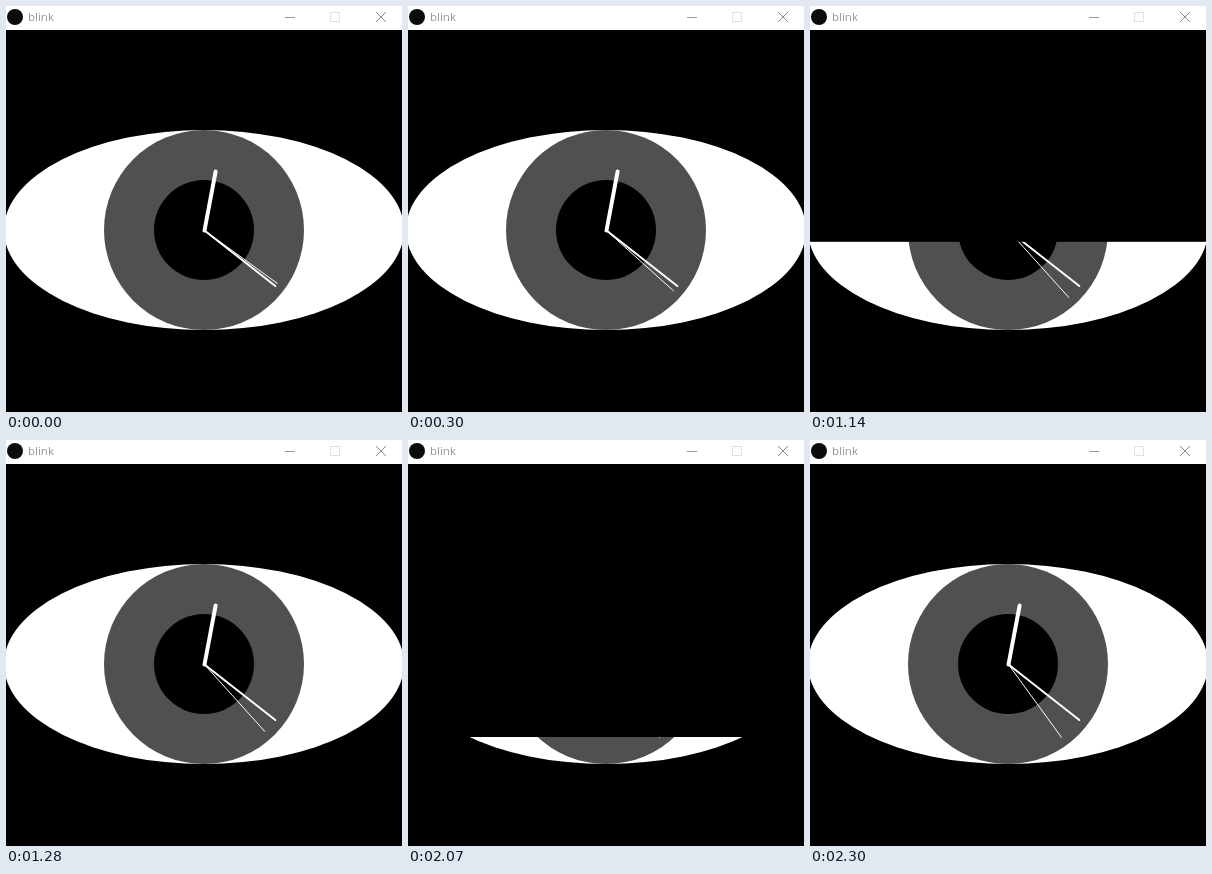
Write an HTML page with a canvas that moves like this. It is 396 px wide and 406 px high and loops after 2960 ms.

```html
<!DOCTYPE html>
<html lang="en">
<head>
<meta charset="utf-8">
<title>blink</title>
<style>
html, body { margin: 0; width: 100%; height: 100%; overflow: hidden; background: #000; }
canvas { display: block; }
</style>
</head>
<body>
<canvas id="stage" width="396" height="406"></canvas>
<script>
const ctx = document.getElementById('stage').getContext('2d');
const LOOP = 2960;
const CX = 198, CY = 224;
const EYE_TOP = 124, EYE_BOTTOM = 324;
const LID_SPEED = 0.9; // px per ms while opening

// Each second ticks at the first step; the lid snaps shut, then lifts.
const blinks = [
  { steps: [30, 80, 130, 190, 240, 300], lift: 70 },
  { steps: [1000, 1040, 1090, 1140, 1180, 1230, 1280], lift: 1042 },
  { steps: [1970, 2020, 2070, 2120, 2170, 2220, 2260, 2300], lift: 2040 }
];

function ellipse(x, y, rx, ry, color) {
  ctx.fillStyle = color;
  ctx.beginPath();
  ctx.ellipse(x, y, rx, ry, 0, 0, Math.PI * 2);
  ctx.fill();
}

function line(x1, y1, x2, y2, color, width) {
  ctx.strokeStyle = color;
  ctx.lineWidth = width;
  ctx.beginPath();
  ctx.moveTo(x1, y1);
  ctx.lineTo(x2, y2);
  ctx.stroke();
}

function hand(turn, length, width) {
  const a = turn * Math.PI * 2, x = CX + 0.5, y = CY + 0.5;
  line(x, y, x + Math.sin(a) * length, y - Math.cos(a) * length, '#fff', width);
}

function lidEdge(t) {
  const blink = blinks.filter(b => t >= b.steps[0]).pop();
  if (!blink) return EYE_TOP;
  const { steps, lift } = blink;
  const i = steps.filter(s => t >= s).length - 1;
  if (i === 0 || i === steps.length - 1) return EYE_TOP;
  const y = EYE_BOTTOM - LID_SPEED * (steps[i] - lift);
  return Math.min(EYE_BOTTOM, Math.max(EYE_TOP, y));
}

function drawTitleBar() {
  ctx.fillStyle = '#fff';
  ctx.fillRect(0, 0, 396, 24);
  ellipse(9, 11, 8, 8, '#0c0c0c');
  ctx.fillStyle = '#949494';
  ctx.font = '11.5px "Open Sans", "Noto Sans", sans-serif';
  ctx.fillText('blink', 22, 15);
  ctx.lineCap = 'butt';
  line(279, 11.5, 289, 11.5, '#999', 1);
  ctx.strokeStyle = '#e0e0e0';
  ctx.strokeRect(324.5, 6.5, 9, 9);
  line(370, 6, 380, 16, '#888', 1);
  line(380, 6, 370, 16, '#888', 1);
}

function drawEye(t) {
  const second = 21 + blinks.filter(b => t >= b.steps[0]).length;
  const minute = 21 + 21 / 60;
  ellipse(CX, CY, 200, 100, '#fff');
  ellipse(CX, CY, 100, 100, '#505050');
  ellipse(CX, CY, 50, 50, '#000');
  ctx.lineCap = 'round';
  hand(second / 60, 90, 1);
  hand(minute / 60, 90, 2);
  hand(minute / 720, 60, 4);
  ctx.fillStyle = '#000';
  ctx.fillRect(0, 24, 396, lidEdge(t) - 24);
}

function frame() {
  const t = performance.now() % LOOP;
  ctx.fillStyle = '#000';
  ctx.fillRect(0, 0, 396, 406);
  drawEye(t);
  drawTitleBar();
  requestAnimationFrame(frame);
}
frame();
</script>
</body>
</html>
```
